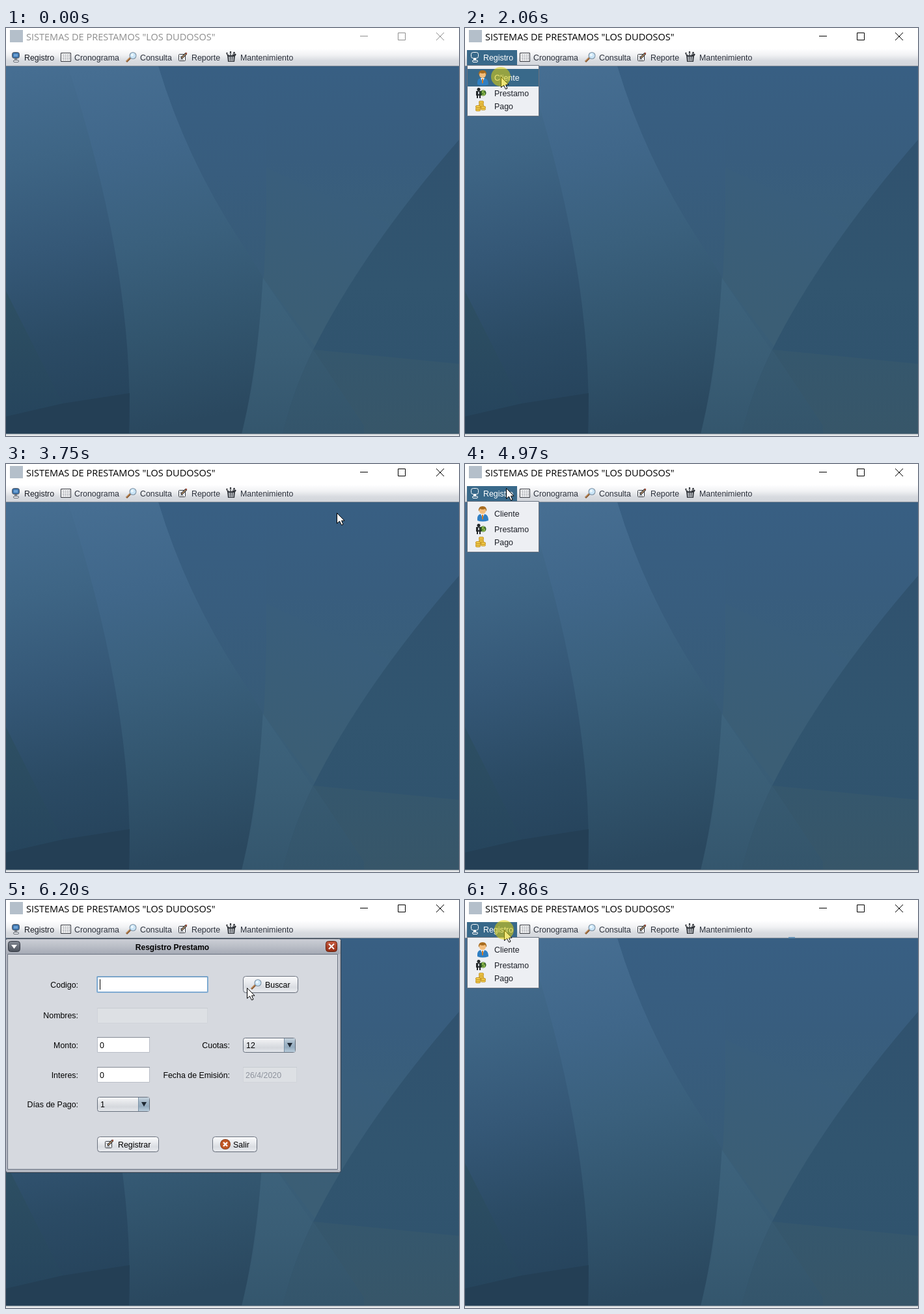
Write an HTML page with a canvas that moves like this. It is 696 px wide and 628 px high and loops after 8 s.

```html
<!DOCTYPE html>
<html lang="es">
<head>
<meta charset="utf-8">
<style>
html, body { margin: 0; width: 100%; height: 100%; overflow: hidden; background: #fff; }
canvas { display: block; }
</style>
</head>
<body>
<canvas id="stage" width="696" height="628"></canvas>
<script>
const c = document.getElementById('stage').getContext('2d');
const LOOP = 8000;
const SANS = '"Liberation Sans", Arial, sans-serif';
const INK = '#1b1e26', SELECT = '#39698a';

// Pointer gestures: [time, x, y] keys; the pointer rests between gestures.
const gestures = [
  [[210, 457, 516], [430, 182, 145]],
  [[690, 176, 141], [1170, 49, 54]],
  [[1650, 49, 56], [1970, 55, 75]],
  [[2380, 68, 82], [2540, 240, 111], [2780, 460, 90], [3100, 484, 82]],
  [[3190, 486, 81], [3510, 508, 75]],
  [[3920, 496, 75], [4560, 63, 34]],
  [[4970, 63, 37], [5370, 63, 109]],
  [[5960, 80, 112], [6200, 370, 135], [6740, 508, 81]],
  [[6820, 506, 78], [6980, 502, 72]],
  [[7290, 490, 72], [7770, 60, 46]]
];
const presses = [[1250, 1410], [2060, 2150], [3590, 3750], [4660, 4740], [5470, 5730], [7040, 7120], [7860, 8000]];
const menuOpen = [[1250, 2150], [4660, 5730], [7860, 8000]];

const within = (t, spans) => spans.some(([a, b]) => t >= a && t < b);

function pointerAt(t) {
  const keys = gestures.filter(g => g[0][0] <= t).pop();
  if (!keys) return null;
  const start = keys[0][0];
  const q = start + Math.floor((t - start + 1) / 80) * 80;
  const i = keys.findIndex(k => k[0] > q);
  if (i < 0) return keys[keys.length - 1].slice(1);
  const [ta, xa, ya] = keys[i - 1], [tb, xb, yb] = keys[i];
  const u = (q - ta) / (tb - ta), e = u * u * (3 - 2 * u);
  return [Math.round(xa + (xb - xa) * e), Math.round(ya + (yb - ya) * e)];
}

function ramp(x0, y0, x1, y1, ...colors) {
  const g = c.createLinearGradient(x0, y0, x1, y1);
  colors.forEach((col, i) => g.addColorStop(i / (colors.length - 1), col));
  return g;
}
const down = (y, h, ...colors) => ramp(0, y, 0, y + h, ...colors);

function rect(x, y, w, h, fill) { c.fillStyle = fill; c.fillRect(x, y, w, h); }

function box(x, y, w, h, r, fill, stroke) {
  c.beginPath();
  c.roundRect(x + .5, y + .5, w - 1, h - 1, r);
  if (fill) { c.fillStyle = fill; c.fill(); }
  if (stroke) { c.strokeStyle = stroke; c.lineWidth = 1; c.stroke(); }
}

function poly(points, fill) {
  c.beginPath();
  for (let i = 0; i < points.length; i += 2) c.lineTo(points[i], points[i + 1]);
  c.closePath();
  c.fillStyle = fill;
  c.fill();
}

function shape(d, fill) { c.fillStyle = fill; c.fill(new Path2D(d)); }
function stroke(d, color, width = 1) {
  c.strokeStyle = color;
  c.lineWidth = width;
  c.stroke(new Path2D(d));
}
function disc(x, y, r, fill) {
  c.beginPath();
  c.arc(x, y, r, 0, 7);
  c.fillStyle = fill;
  c.fill();
}

function text(s, x, y, color = INK, align = 'left', font = '12.4px ' + SANS) {
  c.font = font;
  c.textAlign = align;
  c.fillStyle = color;
  c.fillText(s, x, y);
}

function at(x, y, draw) { c.save(); c.translate(x, y); draw(); c.restore(); }

const icons = {
  monitor(on) {
    box(1, 0, 12, 10, 3, on ? SELECT : '#3d74ad', on ? '#fff' : '#52565e');
    rect(4, 3, 6, 4, on ? '#39698a' : '#6ba0d4');
    rect(5, 10, 4, 2, on ? '#fff' : '#888d94');
    box(3, 12, 9, 4, 2, on ? SELECT : '#e8eaee', on ? '#fff' : '#666b74');
  },
  calendar() {
    box(0, 0, 16, 14, 0, '#fff', '#30333a');
    for (let r = 0; r < 4; r++)
      for (let k = 0; k < 4; k++) rect(3 + k * 3, 3 + r * 2.5, 2, 1, '#70757e');
  },
  lens() {
    stroke('M1 15L7 9', '#8a5a34', 3);
    stroke('M1 14L6 9', '#dba25f', 1);
    disc(11, 5.5, 5.5, '#7f93a5');
    disc(11, 5.5, 4.4, '#c9e4f6');
    disc(10, 4.5, 2, '#eef8ff');
  },
  note() {
    box(0, 3, 11, 11, 1, '#fff', '#30343b');
    rect(2, 6, 4, 1, '#9196a0');
    rect(2, 11, 6, 1, '#9196a0');
    stroke('M4 10L12 2', '#35393f', 3.4);
    stroke('M5 9L11 3', '#c99b68', 1.3);
    disc(12, 2, 1.2, '#a64a38');
  },
  cup() {
    stroke('M4 8L1 2M7 8V0M10 8L13 1M12 8L15 4', '#25282d', 2.2);
    stroke('M3 5L2 3M7 6V2M11 5L12 3', '#d5d8dd');
    poly([2, 6, 14, 6, 13, 16, 3, 16], '#33373d');
    stroke('M5 8L5.5 15M8 8V15M11 8L10.5 15', '#d0d4d9', 1.6);
  },
  client() {
    shape('M1 22Q0 13 6 12H12Q18 13 18 22Q9 25 1 22Z', '#2f7fc3');
    poly([6, 12, 12, 12, 9, 18], '#f4f7fa');
    poly([8, 13, 10, 13, 10, 19, 9, 21, 8, 19], '#d57a24');
    disc(9, 7, 5, '#f3bd7c');
    shape('M3 8Q2 0 9 0Q16 0 15 8L13 4Q9 6 5 4Z', '#a86b1e');
  },
  loan() {
    disc(4, 2.5, 2.5, '#24282a');
    rect(0, 5, 8, 7, '#24282a');
    rect(1, 11, 2, 5, '#24282a');
    rect(5, 11, 2, 5, '#24282a');
    rect(3, 6, 2, 4, '#c7cdd0');
    disc(11, 8, 4.5, '#315f28');
    stroke('M13 5H10V8H13V11H9', '#a7cf55', 1.4);
  },
  coins() {
    for (const [x, y, n] of [[5, 0, 4], [0, 7, 3], [8, 8, 2]])
      for (let i = n; i--;) box(x, y + i * 2.6, 8, 4, 2, '#f5d04e', '#c29020');
  },
  exit() {
    disc(8, 8, 8, '#8d3d18');
    disc(8, 8, 7, '#c25825');
    stroke('M5 5L11 11M11 5L5 11', '#fff', 2.4);
  }
};
const icon = (name, x, y, on) => at(x, y, () => icons[name](on));

function desktop() {
  c.save();
  c.beginPath();
  c.rect(0, 59, 696, 566);
  c.clip();
  rect(0, 59, 696, 566, down(59, 566, '#385f83', '#385d7e', '#3a5f79', '#395d76', '#34556c'));
  poly([400, 215, 590, 302, 475, 490, 395, 385], ramp(500, 260, 430, 440, '#395e7c', '#3a5e78', '#3b5e75'));
  // Lighter wedge, then the large dark arc on the right
  shape('M395 385L545 605V625H362Q384 545 388 470Z', down(385, 240, '#3d637d', '#3a5e76', '#34566d'));
  shape('M696 172Q548 343 472 495Q440 560 425 625H696Z', down(172, 453, '#30526f', '#31556f', '#2f526d'));
  shape('M472 495L696 517V625H548Z', down(495, 130, '#35576d', '#375669'));
  shape('M472 495L550 612V625H425Q440 560 472 495Z', down(495, 130, '#375a71', '#34556b'));
  // Centre fold and the bright ribbon
  shape('M234 58Q276 198 358 325L397 240Q400 470 362 625H60V58Z',
    ramp(150, 59, 260, 610, '#466e92', '#40678a', '#3a607d', '#32556e', '#2a485f'));
  shape('M234 58H400V270Q399 335 396 385L358 325Q276 198 234 58Z',
    down(59, 330, '#385f83', '#385d7e', '#375b77'));
  shape('M0 58H95Q198 375 189 625H0Z',
    ramp(40, 59, 150, 610, '#466e92', '#3e6585', '#355877', '#2b4b65', '#25425a'));
  poly([0, 405, 87, 578, 0, 598], down(405, 190, '#2e5064', '#26455d'));
  poly([0, 598, 87, 578, 190, 562, 189, 625, 0, 625], '#243f55');
  c.restore();
  rect(0, 624, 696, 1, '#5c7180');
  rect(0, 625, 696, 3, down(625, 3, '#c9ced2', '#f4f5f6'));
}

function titleBar(active) {
  const ink = active ? '#000' : '#8e8e8e';
  rect(0, 0, 696, 33, '#fff');
  rect(6, 3, 20, 19, '#b4bfca');
  text('SISTEMAS DE PRESTAMOS "LOS DUDOSOS"', 31, 19, ink, 'left', '14.5px "Open Sans", "Noto Sans", sans-serif');
  rect(544, 12, 12, 1, ink);
  box(602, 7, 12, 12, 0, null, ink);
  stroke('M661 7L673 19M673 7L661 19', ink);
}

function menuBar(open) {
  rect(0, 33, 696, 26, down(33, 26, '#fdfdfe', '#f1f2f4', '#d8dbe0', '#d2d5db'));
  rect(0, 58, 696, 1, '#7f8b97');
  if (open) rect(3, 34, 77, 24, SELECT);
  icon('monitor', 8, 37, open);
  text('Registro', 28, 50, open ? '#fff' : INK);
  const items = [['calendar', 84, 38, 'Cronograma', 105], ['lens', 184, 37, 'Consulta', 206],
    ['note', 265, 37, 'Reporte', 285], ['cup', 338, 36, 'Mantenimiento', 360]];
  for (const [name, x, y, label, lx] of items) {
    icon(name, x, y);
    text(label, lx, 50, '#2b303b');
  }
}

function popup(pointer) {
  box(3, 57, 111, 79, 0, '#edeff3', '#69727f');
  const rows = [['Cliente', 63, 27, 81, 'client', 18, 65], ['Prestamo', 91, 20, 105, 'loan', 17, 92],
    ['Pago', 111, 20, 125, 'coins', 16, 112]];
  for (const [label, y, h, base, name, ix, iy] of rows) {
    const on = pointer[1] >= y && pointer[1] < y + h;
    if (on) rect(4, y, 109, h, SELECT);
    icon(name, ix, iy);
    text(label, 45, base, on ? '#fff' : INK);
  }
}

function frame(w, h, title, red) {
  box(-1, 59, w + 1, h, 3, '#b3b7c1', '#343e4b');
  rect(0, 61, w - 1, 22, down(61, 22, '#cbced5', '#b9bdc6', '#a5aab5'));
  rect(w - 5, 84, 2, h - 29, '#c9ccd4');
  box(2, 83, w - 7, h - 29, 0, '#d6d9df', '#697180');
  text(title, w / 2 - 2, 77, '#000', 'center', 'bold 12px ' + SANS);
  box(3, 63, 19, 17, 4, down(63, 17, '#858b95', '#4a505a'), '#343943');
  poly([8, 69, 17, 69, 12.5, 75], '#fff');
  box(w - 24, 63, 18, 17, 4, down(63, 17, red ? '#c85d42' : '#cc6a35', red ? '#942b12' : '#963908'), '#64200c');
  at(w - 15, 71.5, () => stroke('M-4 -4L4 4M4 -4L-4 4', '#fff', 2));
}

function labels(right, rows) {
  for (const [s, y] of rows) text(s, right, y, '#000', 'right');
}

function ring(x, y, w, h, r) { box(x - 1, y - 1, w + 2, h + 2, r, '#a4c3df', '#8db4d6'); }

function field(x, y, w, { value = '', off = false, focus = false } = {}) {
  if (focus) ring(x, y, w, 24, 1);
  box(x, y, w, 24, 0, off ? '#dde0e4' : '#fff', off ? '#d0d4da' : focus ? '#6f9fcb' : '#b9bec7');
  rect(x, y, w, 1, off ? '#c8ccd2' : focus ? '#6390b8' : '#858b95');
  text(value, x + 4, y + 17, off ? '#8e939d' : '#000');
  if (focus) rect(x + 4, y + 4, 1, 16, '#000');
}

function button(x, y, w, h, label, name) {
  box(x, y + 1, w, h, 4, '#b8bcc4');
  box(x, y, w, h, 4, down(y, h, '#fbfbfc', '#eceef1', '#dadde2', '#eceef2'), '#6c737f');
  icon(name, x + 12, y + (h - 16) / 2);
  text(label, x + (name === 'lens' ? 34 : 32), y + h / 2 + 5, '#000');
}

function combo(x, y, w, value, focus) {
  if (focus) ring(x, y, w, 23, 4);
  box(x, y, w, 23, 3, down(y, 23, '#fafafb', '#e5e7ea', '#d5d8dd', '#e6e9ed'), focus ? '#5f8db8' : '#666f7c');
  rect(x + w - 17, y + 1, 16, 21, down(y, 22, '#ccd8e2', '#a5b9c9', '#94abbe', '#b9cddc'));
  rect(x + w - 18, y + 1, 1, 21, '#7b92a6');
  poly([x + w - 13, y + 8, x + w - 5, y + 8, x + w - 9, y + 15], '#1e2832');
  text(value, x + 5, y + 16, '#000');
}

function clientDialog() {
  frame(528, 471, 'Registro de Cliente');
  labels(216, [['Tipo:', 128], ['DNI (8 dígitos):', 168], ['Nombre:', 214], ['Telefono:', 260],
    ['Dirección:', 306], ['Correo:', 353], ['Labor:', 399], ['Nombre Persona de Contacto:', 445]]);
  combo(303, 107, 69, 'Natural', true);
  for (const y of [151, 197, 243, 289, 336, 382]) field(303, y, 134);
  field(303, 428, 134, { off: true });
  button(124, 480, 90, 24, 'Ingresar', 'note');
  button(338, 480, 69, 24, 'Salir', 'exit');
}

function loanDialog() {
  frame(515, 361, 'Resgistro Prestamo', true);
  labels(111, [['Codigo:', 135], ['Nombres:', 182], ['Monto:', 228], ['Interes:', 274], ['Días de Pago:', 319]]);
  labels(344, [['Cuotas:', 228], ['Fecha de Emisión:', 274]]);
  field(140, 118, 170, { focus: true });
  field(140, 166, 170, { off: true });
  field(140, 211, 81, { value: '0' });
  field(140, 257, 81, { value: '0' });
  field(364, 257, 83, { value: '26/4/2020', off: true });
  combo(364, 212, 81, '12');
  combo(140, 303, 81, '1');
  button(364, 117, 85, 26, 'Buscar', 'lens');
  button(140, 364, 95, 24, 'Registrar', 'note');
  button(317, 364, 69, 24, 'Salir', 'exit');
}

function arrow([x, y], pressed) {
  at(x + .5, y + .5, () => {
    const d = 'M0 0V16L4 12.5L7 18.5L9.5 17.5L7 11.7H11.5Z';
    shape(d, '#fff');
    stroke(d, '#000');
  });
  if (pressed) disc(x, y, 15, 'rgba(225,210,10,.55)');
}

function draw(t) {
  const pointer = pointerAt(t), open = within(t, menuOpen);
  desktop();
  titleBar(t >= 1250);
  menuBar(open);
  if (t >= 7120) rect(497, 57, 10, 2, '#6592b5');
  if (within(t, [[2150, 3750]])) clientDialog();
  if (within(t, [[5730, 7120]])) loanDialog();
  if (open) popup(pointer);
  if (pointer) arrow(pointer, within(t, presses));
}

const origin = performance.now();
function tick() {
  draw((performance.now() - origin) % LOOP);
  requestAnimationFrame(tick);
}
tick();
</script>
</body>
</html>
```
